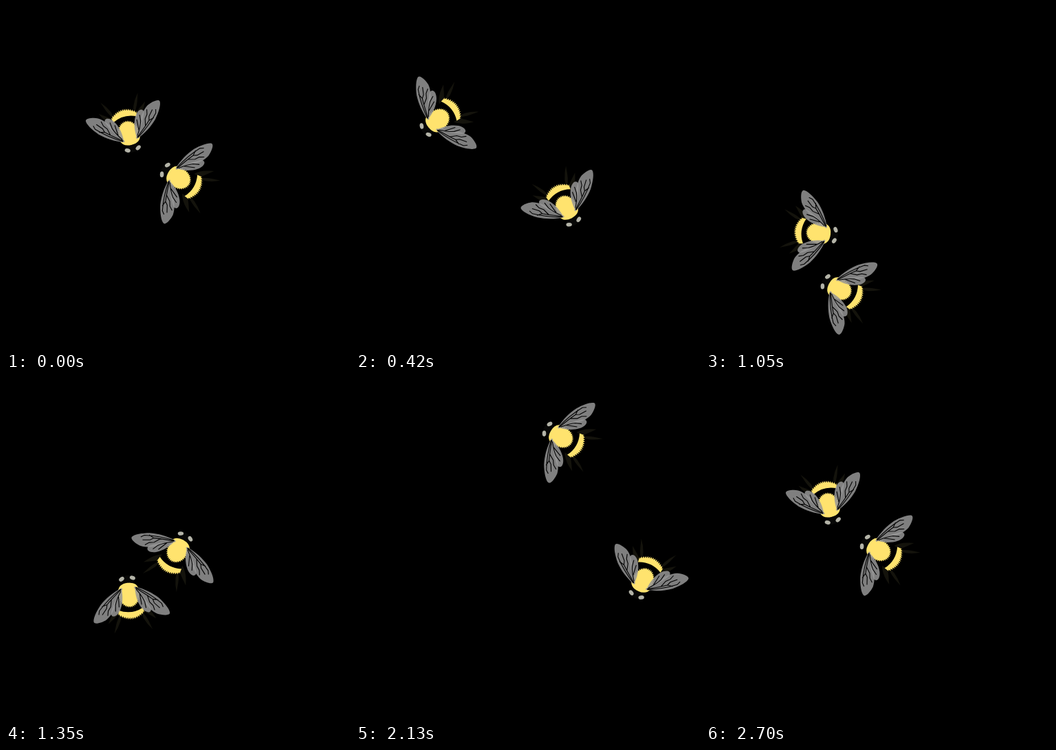
These frames come from a looping animation (500x500 px, 2730 ms). An HTML page with a canvas:

```html
<!DOCTYPE html>
<html lang="en">
<head>
<meta charset="utf-8">
<title>Bees</title>
<style>
html, body { margin: 0; height: 100%; overflow: hidden; background: #000; }
canvas { display: block; }
</style>
</head>
<body>
<canvas id="stage" width="500" height="500"></canvas>
<script>
const ctx = document.getElementById('stage').getContext('2d');
const STEP = 30, LOOP = 2730, LAP = 2700, FLAP = 450;
const YELLOW = '#ffe36e', WING = 'rgba(150,150,150,.85)';

// One lobe of the figure eight (along, across), evenly spaced in time
const LOBE = [[0, 0], [31, 45], [74, 76], [127, 85], [165, 48],
              [179, -3], [161, -56], [124, -87], [74, -76], [31, -43]];

// Headings are [ms, degrees]; place turns (along, across) into stage coordinates
const bees = [
  {
    delay: 0, flapPeak: 15,
    place: (u, v) => [250 - u, 249.5 - v],
    heading: [[0, 211], [420, 141], [780, 69], [1350, -61], [1740, 23], [2130, 115], [2700, 211]]
  },
  {
    delay: 240, flapPeak: 285,
    place: (u, v) => [249 + v, 250 + u],
    heading: [[0, 75], [240, 27], [420, 62], [780, 159], [1350, 263], [1590, 307],
              [1740, 276], [2130, 210], [2700, 75]]
  }
];

const lerp = (a, b, f) => a + (b - a) * f;

function knot(i) {
  const n = (i + 20) % 20, side = n < 10 ? 1 : -1;
  const [u, v] = LOBE[n % 10];
  return [side * u, v];
}

// Smooth closed curve through the knots
function pathPoint(t) {
  const pos = ((t + LAP) % LAP) / LAP * 20, i = Math.floor(pos), f = pos - i;
  const [a, b, c, d] = [-1, 0, 1, 2].map(k => knot(i + k));
  return [0, 1].map(k => b[k] + f / 2 * (c[k] - a[k]
    + f * (2 * a[k] - 5 * b[k] + 4 * c[k] - d[k]
    + f * (3 * (b[k] - c[k]) + d[k] - a[k]))));
}

function headingAt(keys, t) {
  const i = Math.max(1, keys.findIndex(k => k[0] >= t));
  const [t0, a0] = keys[i - 1], [t1, a1] = keys[i];
  return lerp(a0, a1, (t - t0) / (t1 - t0)) * Math.PI / 180;
}

function oval(x, y, rx, ry, color, tilt = 0) {
  ctx.fillStyle = color;
  ctx.beginPath();
  ctx.ellipse(x, y, rx, ry, tilt, 0, 7);
  ctx.fill();
}

const FOREWING = new Path2D('M0-1C14-7 26-9 38-9C50-8 61-5 64-1C66 3 56 9 50 11C42 13 30 11 24 8C14 5 8 3 0 1Z');
const HINDWING = new Path2D('M2 1C14 2 32 6 39 11C43 17 35 20 27 18C16 15 8 8 2 1Z');
const VEINS = new Path2D('M2-1Q25-6 46-5L51-2M2 0Q22-2 32-2L37 1L48 2M22-2L31 4L38 5L44 9M4 1Q18 4 25 8L32 14M32-2L39-6M12 3L24 14');
const LEGS = new Path2D('M13 24Q21 34 24 43L28 55Q21 47 17 38ZM15 16Q26 22 32 34L35 40Q23 32 14 24Z');

function drawWing(halfAngle) {
  ctx.save();
  ctx.translate(9, -9);
  ctx.rotate(Math.PI / 2 - halfAngle);
  ctx.fillStyle = WING;
  ctx.fill(FOREWING);
  ctx.fill(HINDWING);
  ctx.strokeStyle = '#000';
  ctx.lineWidth = 1.1;
  ctx.stroke(VEINS);
  ctx.restore();
}

function drawBand() {
  ctx.fillStyle = YELLOW;
  ctx.beginPath();
  ctx.moveTo(-18, 22);
  ctx.quadraticCurveTo(0, 31, 18, 22);
  for (let i = 0; i <= 28; i++) {
    const x = 19 - i * 38 / 28;
    ctx.lineTo(x, 37.5 - x * x / 46 - (i % 2 ? 3 : 0));
  }
  ctx.fill();
}

function drawThorax() {
  ctx.fillStyle = YELLOW;
  ctx.beginPath();
  for (let i = 0; i < 72; i++) {
    const a = i * Math.PI / 36, r = i % 2 ? 0.9 : 1.04;
    ctx.lineTo(15 * r * Math.cos(a), 2 + 17.5 * r * Math.sin(a));
  }
  ctx.fill();
  // Collar that widens the front
  ctx.beginPath();
  ctx.moveTo(-15, -6);
  ctx.quadraticCurveTo(-13, -16, 0, -16);
  ctx.quadraticCurveTo(13, -16, 15, -6);
  ctx.fill();
}

function eachSide(draw) {
  for (const side of [1, -1]) {
    ctx.save();
    ctx.scale(side, 1);
    draw();
    ctx.restore();
  }
}

function drawBee(bee, t) {
  const [x, y] = bee.place(...pathPoint(t - bee.delay));
  const flap = Math.cos((t - bee.flapPeak) / FLAP * 2 * Math.PI);
  const halfAngle = (54 + 12 * flap) * Math.PI / 180;
  ctx.save();
  ctx.translate(x, y);
  ctx.rotate(headingAt(bee.heading, t) + Math.PI / 2);
  ctx.fillStyle = '#14130c';
  eachSide(() => ctx.fill(LEGS));
  oval(0, 19, 17, 20, '#000');
  drawBand();
  oval(0, -20, 10, 7, '#080807');
  drawThorax();
  eachSide(() => drawWing(halfAngle));
  eachSide(() => oval(8, -22.5, 4.2, 2.8, '#b4b4a8', 0.5));
  ctx.restore();
}

function render() {
  const t = Math.floor(performance.now() % LOOP / STEP) * STEP;
  ctx.fillStyle = '#000';
  ctx.fillRect(0, 0, 500, 500);
  bees.forEach(bee => drawBee(bee, t));
  requestAnimationFrame(render);
}
render();
</script>
</body>
</html>
```
